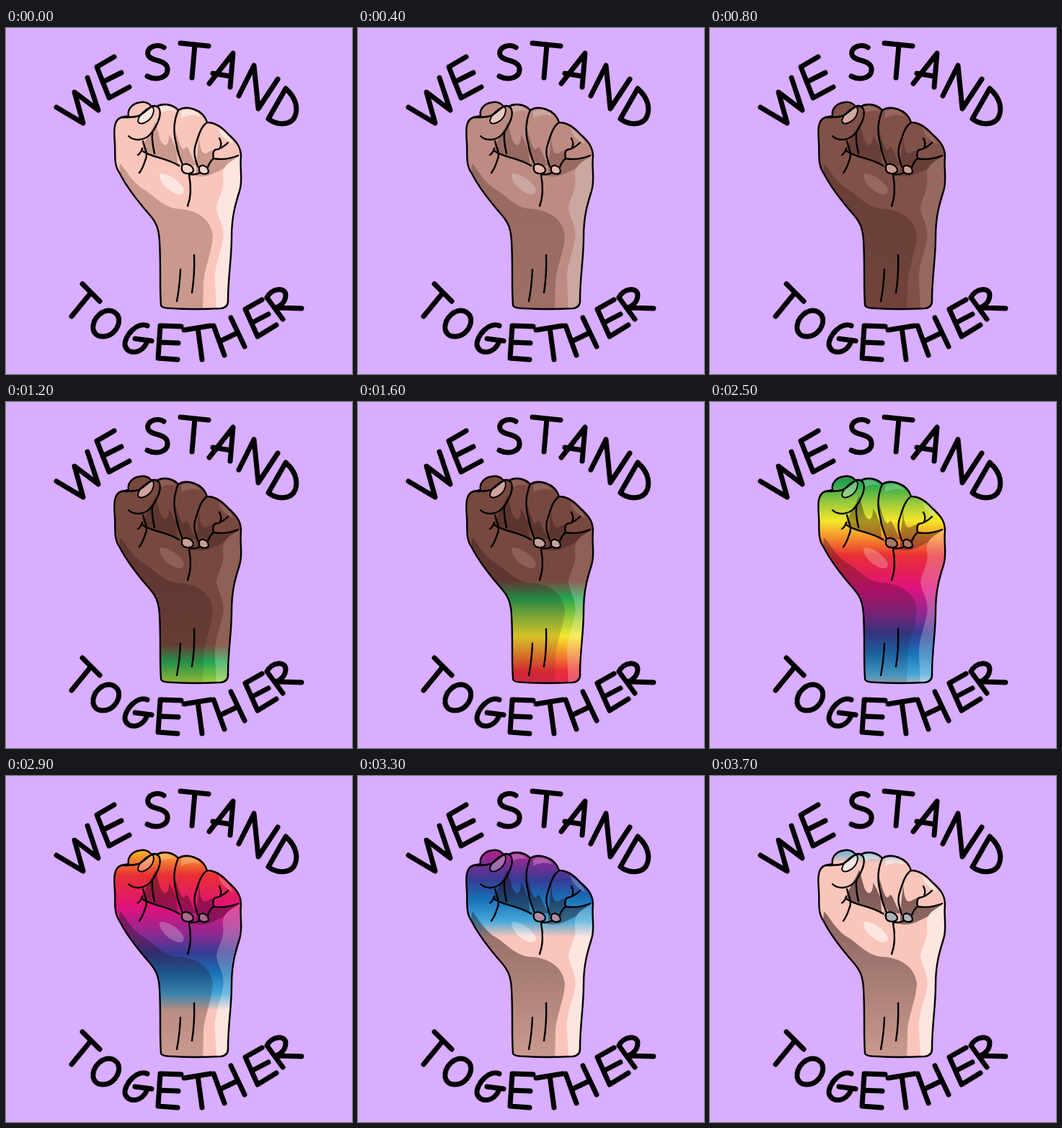
An HTML page with a canvas for the animation above (3800 ms loop, 480x480 px).

```html
<!DOCTYPE html>
<html lang="en">
<head>
<meta charset="utf-8">
<title>We stand together</title>
<style>
html, body { margin: 0; width: 100%; height: 100%; overflow: hidden; background: #d9adff; }
canvas { display: block; width: 480px; height: 480px; }
</style>
</head>
<body>
<canvas id="stage" width="480" height="480" role="img" aria-label="WE STAND TOGETHER"></canvas>
<script>
const ctx = document.getElementById('stage').getContext('2d');
const LOOP = 3800, STEP = 100;

const hand = new Path2D(`M215 384 C213 360 215 330 213 296 C212 276 207 268 200 260
  C186 244 168 222 158 202 C149 190 152 176 151 160 C150 145 148 128 160 124 L170 122
  C168 112 176 104 187 103 C194 102 199 105 202 109 Q205 107 209 109
  C217 104 231 105 239 114 C250 107 273 112 279 131 C291 131 300 138 308 147
  C318 156 326 164 326 178 C324 196 329 211 324 226 C318 245 313 262 313 290
  C313 320 308 346 308 376 Q309 388 298 389 Q260 391 231 389 Q215 389 215 384 Z`);

const shade = new Path2D(`M158 188 C166 195 172 210 188 222 C208 233 216 249 240 251
  C262 252 284 263 287 288 C286 310 276 330 274 352 L273 395 H140 Z
  M207 130 C200 149 187 162 190 171 C203 179 224 181 240 190 L248 188
  C237 177 234 158 226 148 C227 160 221 170 214 155 Z
  M234 138 C240 160 244 174 249 166 C253 160 256 180 264 188 V202 H246 L238 187 Z
  M268 150 C269 171 273 178 281 172 L290 168 L287 181 L280 193 L264 190 Z
  M240 188 C248 206 272 210 287 202 Q306 195 322 179 Q304 184 289 181 L280 193 Z`);

const light = new Path2D(`M328 176 C313 184 299 190 301 207 C304 228 292 238 292 251
  C295 267 304 275 301 294 C296 319 289 330 290 352 L292 395 H340 V176 Z
  M213 203 C220 199 240 210 246 222 C249 231 241 233 232 228 C221 223 212 211 213 203 Z
  M243 116 C252 110 265 114 270 123 C261 119 252 120 243 125 Z
  M211 110 C220 106 231 109 235 116 C227 113 219 115 213 119 Z
  M295 139 C305 145 314 155 315 161 C306 156 297 150 295 139 Z`);

const thumbNail = new Path2D('M183 129 C184 121 194 112 202 109 C207 111 205 121 199 127 C191 134 184 134 183 129 Z');
const nails = new Path2D(`M244 191 C248 186 260 190 260 198 C258 203 247 204 244 197 Z
  M268 193 C272 188 281 192 281 200 C278 204 269 203 268 198 Z`);

const creases = new Path2D(`M160 124 C172 124 178 124 184 122 C194 117 198 109 206 108
  C216 109 215 121 210 132 C204 145 197 154 184 155 Q175 155 170 150
  M190 157 C192 167 198 174 193 184 Q190 194 185 201 M183 176 Q187 174 189 167
  M190 171 C202 180 221 179 240 191 M203 144 Q202 157 206 174
  M239 114 C233 128 232 145 236 160 Q239 177 245 189
  M279 131 C270 137 267 150 264 159 C259 172 262 180 266 192
  M308 159 Q299 168 290 169 Q286 172 288 181 Q283 185 280 193 M296 153 Q300 160 297 166
  M288 181 Q305 184 322 177 M256 203 Q262 204 269 201
  M254 204 C257 220 257 234 252 247 M242 335 Q241 358 237 379 M261 315 Q262 342 258 367`);

const letters = new Path2D(`M70 110 L107 132 L95 89 L128 114 L113 69
  M150 40 L126 54 L143 97 L171 82 M134 75 L160 62
  M219 27 C211 21 194 26 197 37 C200 47 222 43 224 56 C225 70 208 73 196 67
  M242 21 L281 25 M262 23 L258 69
  M282 77 L315 35 L311 82 M287 63 L312 67
  M323 94 L344 52 L350 112 L377 71
  M388 84 L364 126 C374 134 391 136 399 126 C406 115 404 98 388 84
  M106 355 L130 379 M118 367 L91 400
  M148 393 C135 388 119 403 121 418 C124 432 143 430 151 420 C159 410 159 398 148 393
  M196 413 C182 407 164 427 165 440 C168 454 190 453 196 434 M179 431 L202 434
  M243 414 L214 413 L211 458 L238 460 M213 436 L239 437
  M247 419 L284 413 M266 416 L272 460
  M288 413 L303 454 M312 402 L331 442 M296 435 L321 423
  M355 377 L332 390 L349 428 L375 412 M341 409 L364 397
  M362 374 L384 404 M362 374 C368 361 387 359 388 370 C388 380 381 386 374 388 L410 389`);

// tones: base, shade, light, nail
const PALE = ['#fac5bb', '#c9998d', '#fee5e0', '#fee7e1'];
const DARK = ['#77483f', '#683d35', '#8e6056', '#cda39a'];
const BANDS = [
  [187, '#22a550'], [213, '#92c83c'], [240, '#f6e72a'], [264, '#f38b2c'], [288, '#e92f35'],
  [333, '#df117d'], [370, '#8b2a92'], [396, '#343c94'], [424, '#1872b8'], [453, '#45a8d8']];
const TOP = 163, BOTTOM = 475;
const RISE = [[900, -240], [1600, -85], [2000, 0], [2500, 75], [2900, 150], [3700, 354], [3800, 380]];
const NAIL = [[0, '#f9d3cb'], [800, '#cb9b90'], [1600, '#c5a29b'], [2000, '#7cc482'],
  [2500, '#a67765'], [2900, '#a9688f'], [3700, '#aab4ba'], [3800, '#f9d3cb']];

const clamp = v => Math.max(0, Math.min(1, v));
const lerp = (a, b, p) => a + (b - a) * p;
const rgb = c => [1, 3, 5].map(i => parseInt(c.substr(i, 2), 16));
const hex = v => Math.round(v).toString(16).padStart(2, '0');
function mix(a, b, p) {
  const q = rgb(b);
  return '#' + rgb(a).map((v, i) => hex(lerp(v, q[i], p))).join('');
}
function track(keys, t, blend) {
  let i = 0;
  while (i < keys.length - 2 && t >= keys[i + 1][0]) i++;
  const [a, b] = [keys[i], keys[i + 1]];
  return blend(a[1], b[1], clamp((t - a[0]) / (b[0] - a[0])));
}
const tint = (c, k) => [c, mix(c, '#301018', 0.12), mix(c, '#ffffff', 0.24), mix(c, '#ffffff', 0.3)][k];

function tone(k, t) {
  const rise = track(RISE, t, lerp);
  const g = ctx.createLinearGradient(0, TOP - rise, 0, BOTTOM - rise);
  g.addColorStop(0, mix(PALE[k], DARK[k], clamp(t / 860)));
  for (const [u, c] of BANDS) g.addColorStop((u - TOP) / (BOTTOM - TOP), tint(c, k));
  g.addColorStop(1, PALE[k]);
  return g;
}
// the shade deepens towards the knuckles as the loop goes on
function depth(t) {
  const g = ctx.createLinearGradient(0, 130, 0, 387);
  g.addColorStop(0, `rgba(30, 10, 18, ${0.5 * t / LOOP})`);
  g.addColorStop(1, 'rgba(30, 10, 18, 0)');
  return g;
}
function fill(path, style) {
  ctx.fillStyle = style;
  ctx.fill(path);
}
function line(path, width) {
  ctx.lineWidth = width;
  ctx.stroke(path);
}

function draw(t) {
  ctx.fillStyle = '#d9adff';
  ctx.fillRect(0, 0, 480, 480);
  ctx.strokeStyle = '#000';
  ctx.lineCap = ctx.lineJoin = 'round';
  ctx.save();
  ctx.clip(hand);
  fill(hand, tone(0, t));
  fill(shade, tone(1, t));
  fill(shade, depth(t));
  fill(light, tone(2, t));
  fill(thumbNail, tone(3, t));
  ctx.restore();
  fill(nails, track(NAIL, t, mix));
  line(thumbNail, 1.8);
  line(nails, 2.2);
  line(creases, 2.4);
  line(hand, 2.4);
  line(letters, 7);
}

const start = performance.now();
function tick() {
  const t = (performance.now() - start) % LOOP;
  draw(Math.floor(t / STEP) * STEP);
  requestAnimationFrame(tick);
}
tick();
</script>
</body>
</html>
```
